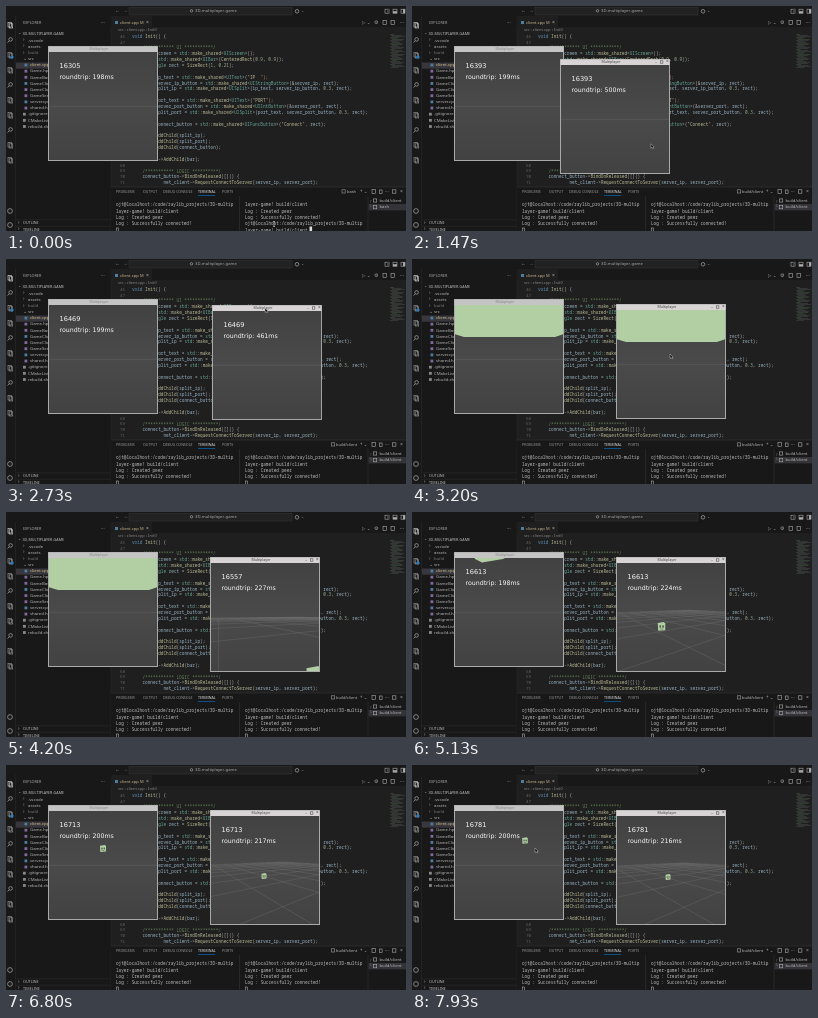
These frames come from a looping animation (400x225 px, 8000 ms). An HTML page with a canvas:

```html
<!DOCTYPE html>
<html lang="en">
<head>
<meta charset="utf-8">
<style>
html, body { margin: 0; width: 100%; height: 100%; overflow: hidden; background: #181818; }
canvas { display: block; width: 100vw; height: 100vh; }
</style>
</head>
<body>
<canvas id="stage" width="400" height="225"></canvas>
<script>
const ctx = document.getElementById('stage').getContext('2d');
const LOOP = 8000, STEPS = 120;
const UI = '"Noto Sans", sans-serif', MONO = '"Noto Sans Mono", monospace', HUD = '"DejaVu Sans", sans-serif';
const GREEN = '#b2cfa3';

const rect = (x, y, w, h, fill) => { ctx.fillStyle = fill; ctx.fillRect(x, y, w, h); };

function text(s, x, y, size, fill, font = UI, align = 'left') {
  ctx.font = `${size}px ${font}`;
  ctx.fillStyle = fill;
  ctx.textAlign = align;
  ctx.textBaseline = 'middle';
  ctx.fillText(s, x, y);
}

function line(points, color, width = 0.6) {
  ctx.beginPath();
  points.forEach(([x, y]) => ctx.lineTo(x, y));
  ctx.strokeStyle = color;
  ctx.lineWidth = width;
  ctx.stroke();
}

function polygon(points, fill) {
  ctx.beginPath();
  points.forEach(([x, y]) => ctx.lineTo(x, y));
  ctx.fillStyle = fill;
  ctx.fill();
}

function box(x, y, w, h, color) {
  ctx.strokeStyle = color;
  ctx.lineWidth = 0.6;
  ctx.strokeRect(x, y, w, h);
}

function ring(x, y, r, color) {
  ctx.beginPath();
  ctx.arc(x, y, r, 0, 7);
  ctx.strokeStyle = color;
  ctx.lineWidth = 0.8;
  ctx.stroke();
}

// Linear interpolation through [time, ...values] keys.
function track(t, keys) {
  if (t <= keys[0][0]) return keys[0].slice(1);
  for (let i = 1; i < keys.length; i++) {
    const a = keys[i - 1], b = keys[i];
    if (t < b[0]) {
      const k = (t - a[0]) / (b[0] - a[0]);
      return a.slice(1).map((v, j) => v + (b[j + 1] - v) * k);
    }
  }
  return keys[keys.length - 1].slice(1);
}

const files = ['.vscode', 'assets', 'build', 'src', 'client.cpp', 'Game.hpp', 'GameBase.hpp',
  'GameClient.cpp', 'GameClient.hpp', 'GameServer.hpp', 'server.cpp', 'shared.hpp',
  '.gitignore', 'CMakeLists.txt', 'rebuild.sh'];

const code = `void Init() {

    /*********** UI ***********/
    auto screen = std::make_shared<UIScreen>();
    bar = std::make_shared<UIBar>(CenteredRect(0.9, 0.9));
    Rectangle rect = SizeRect(1, 0.21);

    auto ip_text = std::make_shared<UIText>("IP  ");
    auto server_ip_button = std::make_shared<UIStringButton>(&server_ip, rect);
    auto split_ip = std::make_shared<UISplit>(ip_text, server_ip_button, 0.3, rect);

    auto port_text = std::make_shared<UIText>("PORT");
    auto server_port_button = std::make_shared<UIIntButton>(&server_port, rect);
    auto split_port = std::make_shared<UISplit>(port_text, server_port_button, 0.3, rect);

    auto connect_button = std::make_shared<UIFuncButton>("Connect", rect);

    bar->AddChild(split_ip);
    bar->AddChild(split_port);
    bar->AddChild(connect_button);

    screen->AddChild(bar);

    /*********** LOGIC **********/
    connect_button->BindOnReleased([]() {
            net_client->RequestConnectToServer(server_ip, server_port);`.split('\n');

const session = ['ojt@localhost:/code/raylib_projects/3D-multip', 'layer-game! build/client',
  'Log : Created peer', 'Log : Successfully connected!'];

function tokenColor(s) {
  if (/^\/\*/.test(s)) return '#64835a';
  if (/^"/.test(s)) return '#b58a74';
  if (/^(void|auto)$/.test(s)) return '#5f8fb4';
  if (/^(std|UI\w+|Rectangle)$/.test(s)) return '#66a797';
  if (/^(make_shared|[A-Z]\w+)$/.test(s)) return '#bdbd98';
  if (/^\d/.test(s)) return '#9eb095';
  return /^\w/.test(s) ? '#98b4c4' : '#b0b0b0';
}

function drawCode() {
  code.forEach((row, i) => {
    const y = 30.5 + i * 5.86;
    text(46 + i, 119, y, 4.2, '#626262', MONO, 'right');
    for (const m of row.matchAll(/\/\*.*|"[^"]*"|[\d.]+\b|\w+|[^\w\s]+/g))
      text(m[0], 126 + m.index * 2.62, y, 4.37, tokenColor(m[0]), MONO);
  });
  // Minimap
  for (let i = 0; i < 34; i++)
    rect(384 + i % 3, 28 + i, 4 + 9 * Math.abs(Math.sin(i * 2.3)), 0.5, i % 5 ? '#454b48' : '#3f5a3c');
}

function drawSidebar() {
  rect(0, 10, 105, 215, '#181818');
  line([[9.5, 10], [9.5, 225]], '#2b2b2b');
  line([[105, 10], [105, 225]], '#2b2b2b');
  for (let i = 0; i < 10; i++) {
    const y = 19 + i * 15;
    if (i % 3 === 1) {
      ring(4.6, y - 0.6, 1.8, '#9a9a9a');
      line([[3.2, y + 0.8], [1.6, y + 2.6]], '#9a9a9a', 0.8);
    } else {
      box(2, y - 2.5, 3.5, 4.5, i ? '#9a9a9a' : '#ddd');
      box(3.2, y - 1.2, 3.5, 4.2, i ? '#9a9a9a' : '#ddd');
    }
  }
  polygon([[4, 51], [6, 49], [8, 51], [6, 53]], '#2c7cc0');
  [205, 219].forEach(y => ring(4, y, 2.4, '#9a9a9a'));

  text('EXPLORER', 17, 16.5, 3.8, '#aaa');
  text('···', 95, 16.5, 4.5, '#aaa');
  text('⌄', 12, 27, 4, '#aaa');
  text('3D-MULTIPLAYER-GAME', 16.5, 28, 3.7, '#c4c4c4');
  rect(10, 56.5, 95, 6.2, '#37373d');
  files.forEach((name, i) => {
    const y = 34.4 + i * 6.15, header = /hpp$/.test(name);
    if (i < 4) text(i < 3 ? '›' : '⌄', 17, y - 0.5, 5, '#999');
    else rect(i < 12 ? 18.5 : 17, y - 1.4, 2.8, 2.8, header ? '#8169a0' : i < 12 ? '#4d7ea0' : '#888');
    text(name, i > 3 && i < 12 ? 24 : 22, y, 4.3, i === 2 ? '#777' : i === 4 ? '#d3bd8b' : '#b4b4b4');
  });
  ['OUTLINE', 'TIMELINE'].forEach((s, i) => {
    const y = 217 + i * 6.5;
    line([[10, y - 3.2], [105, y - 3.2]], '#2b2b2b');
    text('›', 12, y - 0.5, 5, '#aaa');
    text(s, 17, y, 3.7, '#bbb');
  });
}

function drawTop() {
  rect(0, 0, 400, 10, '#181818');
  text('←', 109, 5, 5, '#999');
  text('→', 117, 5, 5, '#777');
  rect(123, 1.5, 163, 7.5, '#222');
  box(123, 1.5, 163, 7.5, '#333');
  ring(185.5, 4.8, 1.2, '#999');
  text('3D-multiplayer-game', 189, 5.3, 4.2, '#aaa');
  ring(291, 5.3, 1.8, '#999');
  text('⌄', 295, 4.5, 4, '#999');
  [379, 387, 395].forEach((x, i) => {
    box(x, 3.2, 4, 4, '#aaa');
    rect(i === 1 ? x : x + 2, i === 1 ? 5.2 : 3.2, i === 1 ? 4 : 2, i === 1 ? 2 : 4, i ? '#aaa' : '#444');
  });
  rect(105, 10, 295, 11, '#181818');
  rect(106, 10, 40, 11, '#1f1f1f');
  rect(109, 15, 3, 3, '#4d7ea0');
  text('client.cpp', 114, 16.5, 4.2, '#cbb98e');
  text('M', 134, 16.5, 4, '#cbb98e');
  text('×', 140, 16.5, 5, '#bbb');
  text('▷ ⌄', 356, 16.5, 4.5, '#aaa');
  text('⚙', 368, 16.5, 5, '#aaa');
  [377, 385].forEach(x => box(x, 14.5, 3.6, 3.8, '#aaa'));
  text('···', 394, 16.5, 5, '#aaa');
  text('src › client.cpp › Init()', 112, 24, 4, '#888');
}

function drawPanel(running) {
  rect(105, 181, 295, 44, '#181818');
  line([[105, 181], [400, 181]], '#333');
  [['PROBLEMS', 110], ['OUTPUT', 137], ['DEBUG CONSOLE', 157], ['TERMINAL', 192], ['PORTS', 216]]
    .forEach(([s, x]) => text(s, x, 185.5, 3.6, x === 192 ? '#ddd' : '#999'));
  line([[192, 189.5], [209, 189.5]], '#0078d4');

  const job = running ? 'build/client' : 'bash';
  box(running ? 325.5 : 336, 183.8, 3.2, 3.2, '#999');
  text(job, running ? 330 : 341, 185.5, 4, '#bbb');
  text('+ ⌄', 354, 185.5, 4.4, '#aaa');
  box(366, 183.6, 3.4, 3.8, '#aaa');
  box(373.5, 184, 2.6, 3.6, '#aaa');
  text('···', 379, 185.5, 4.5, '#aaa');
  box(386.5, 183.8, 3.4, 3.4, '#aaa');
  text('×', 394, 185.5, 5, '#aaa');

  line([[362, 190], [362, 225]], '#333');
  rect(362.5, 198, 37.5, 6.4, '#333338');
  ['build/client', job].forEach((s, i) => {
    const y = 194.5 + i * 6.7;
    text(i ? '└' : '┌', 363.5, y, 4, '#888', MONO);
    box(367.5, y - 1.6, 3.2, 3.2, '#aaa');
    text(s, 373.5, y, 4.2, '#bbb');
  });

  line([[233.5, 190], [233.5, 225]], '#333');
  const rerun = [...session.slice(1), ...session.slice(0, 2)];
  [[110, session], [239, running ? session : rerun]].forEach(([x, rows]) =>
    rows.forEach((s, i) => text(s, x, 199 + i * 6.4, 4.35, '#bcbcbc', MONO)));
  box(110.4, 222, 2.2, 4, '#aaa');
  if (running) box(239.4, 222, 2.2, 4, '#aaa');
  else rect(303.5, 220.5, 2.6, 4.5, '#ddd');
}

// Ground grid seen from a camera at the given height and heading.
function drawGrid(cx, horizon, height, yaw) {
  const focal = 96, near = 0.5, c = Math.cos(yaw), s = Math.sin(yaw);
  const view = (x, z) => [x * c - z * s, x * s + z * c];
  const segment = (a, b) => {
    if (a[1] < near && b[1] < near) return;
    if (a[1] < near) [a, b] = [b, a];
    if (b[1] < near) {
      const k = (a[1] - near) / (a[1] - b[1]);
      b = [a[0] + (b[0] - a[0]) * k, near];
    }
    line([a, b].map(([x, z]) => [cx + focal * x / z, horizon + focal * height / z]), '#6c6c6c', 0.4);
  };
  for (let i = -50; i <= 50; i += 5) {
    segment(view(i, -50), view(i, 50));
    segment(view(-50, i), view(50, i));
  }
}

function drawPlayer([x, y, size]) {
  const h = size / 2, eye = size * 0.15;
  polygon([[x - h, y - h * 0.9], [x + h * 0.6, y - h * 1.2], [x + h, y - h * 0.8],
    [x + h, y + h], [x - h * 0.9, y + h * 1.15]], GREEN);
  rect(x - h * 0.55, y - eye, eye * 1.4, eye * 2, '#4a5544');
  rect(x + h * 0.2, y - eye, eye * 1.4, eye * 2, '#4a5544');
  rect(x - h * 0.4, y + h * 0.55, h * 0.9, eye * 0.7, '#66785e');
}

const plate = [[0, 5], [110, 5], [110, 35], [101, 38], [10, 38], [0, 35]];
const sliver = [[20, 5], [53, 5], [49, 7], [40, 8.5], [28, 10.5], [21, 7]];
const morph = (a, b, k) => a.map((p, i) => p.map((v, j) => v + (b[i][j] - v) * k));

function drawWindow(x, y, focused, ticks, ping, scene) {
  ctx.save();
  ctx.translate(x, y);
  rect(0, 0, 110, 115, '#a9a9a9');
  rect(0.5, 0.5, 109, 5.5, focused ? '#d8d4d6' : '#c4c4c4');
  text('Multiplayer', 51, 3.2, 3.6, focused ? '#444' : '#888', UI, 'center');
  if (focused) {
    text('–', 95, 3, 4, '#444');
    box(100.5, 1.8, 2.4, 2.4, '#555');
    text('×', 106, 3, 4.6, '#444');
  }
  ctx.beginPath();
  ctx.rect(1, 6, 108, 108);
  ctx.clip();
  const sky = ctx.createLinearGradient(0, 6, 0, 114);
  sky.addColorStop(0, '#424242');
  sky.addColorStop(0.5, '#4a4a4a');
  sky.addColorStop(1, '#424242');
  rect(0, 6, 110, 109, sky);
  scene.back();
  text(ticks, 11.5, 20.3, 6.6, '#f8f8f8', HUD);
  text(`roundtrip: ${Math.round(ping)}ms`, 11.5, 31.3, 6.25, '#f8f8f8', HUD);
  scene.front();
  ctx.restore();
}

const flatHorizon = () => line([[0, 60.3], [110, 60.3]], '#606060', 0.6);

function drawLeft(t, ticks) {
  const [ping] = track(t, [[0, 198], [2270, 199], [5130, 198], [6800, 200]]);
  drawWindow(42, 40, false, ticks, ping, {
    back: flatHorizon,
    front() {
      if (t >= 2900 && t < 5260)
        polygon(morph(plate, sliver, track(t, [[4330, 0], [5100, 1]])[0]), GREEN);
      if (t >= 5260)
        drawPlayer(track(t, [[5260, 48, 24, 15], [5700, 51, 35, 9], [6800, 55, 43.5, 6], [7930, 71, 35.5, 5.6]]));
    }
  });
}

function drawRight(t, ticks) {
  const [x, y] = track(t, [[2330, 148, 53], [2600, 203, 50], [2730, 206, 46], [2870, 204, 45]]);
  const [ping] = track(t, [[2600, 500], [3500, 240], [4200, 227], [5130, 224], [6800, 217], [7930, 216]]);
  drawWindow(x, y, true, ticks, ping, {
    back() {
      if (t < 3600) return flatHorizon();
      const [horizon, height, yaw] = track(t, [[3600, 60, 0.2, 0.3], [4200, 58.5, 1.2, 0.45],
        [5130, 49, 3, 0.6], [6800, 47, 3.6, 0.6], [7930, 48, 3.6, 0.65]]);
      drawGrid(55, horizon, height, yaw);
    },
    front() {
      if (t >= 2900 && t < 3900) {
        const [dy] = track(t, [[3550, 0], [3900, -36]]);
        polygon(plate.map(([px, py]) => [px, py + (py > 5 ? dy : 0)]), GREEN);
      }
      if (t >= 3900)
        drawPlayer(track(t, [[3900, 118, 150, 40], [4200, 104, 118, 15], [4600, 72, 88, 11],
          [5130, 45.5, 69.5, 7.5], [6000, 52, 66, 6], [6800, 54, 66, 5], [7930, 52, 67, 5]]));
    }
  });
}

function drawPointer(t) {
  if (t >= 3600 && t < 7300) return;
  if (t < 1000) {
    const [x, y] = track(t, [[0, 268, 218], [900, 274, 210]]);
    line([[x - 1, y - 2.5], [x + 1, y - 2.5]], '#ddd');
    line([[x, y - 2.5], [x, y + 2.5]], '#ddd');
    line([[x - 1, y + 2.5], [x + 1, y + 2.5]], '#ddd');
    return;
  }
  const [x, y] = t < 3600
    ? track(t, [[1000, 270, 200], [1600, 230, 120], [2200, 200, 62], [2330, 201, 56],
      [2600, 256, 53], [2730, 259, 49], [2870, 257, 48], [3100, 258, 95]])
    : [123, 83];
  const arrow = [[0, 0], [0, 4.5], [1.1, 3.5], [2, 5], [2.7, 4.6], [2, 3.2], [3.2, 3.1], [0, 0]]
    .map(([dx, dy]) => [x + dx, y + dy]);
  polygon(arrow, '#111');
  line(arrow, '#ddd', 0.4);
}

function draw() {
  const step = Math.floor((performance.now() % LOOP + 5) / LOOP * STEPS) % STEPS;
  const t = step * LOOP / STEPS, ticks = 16305 + step * 4;
  rect(0, 0, 400, 225, '#1f1f1f');
  drawTop();
  drawSidebar();
  drawCode();
  drawPanel(t >= 1000);
  drawLeft(t, ticks);
  if (t >= 1060) drawRight(t, ticks);
  drawPointer(t);
  requestAnimationFrame(draw);
}
draw();
</script>
</body>
</html>
```
